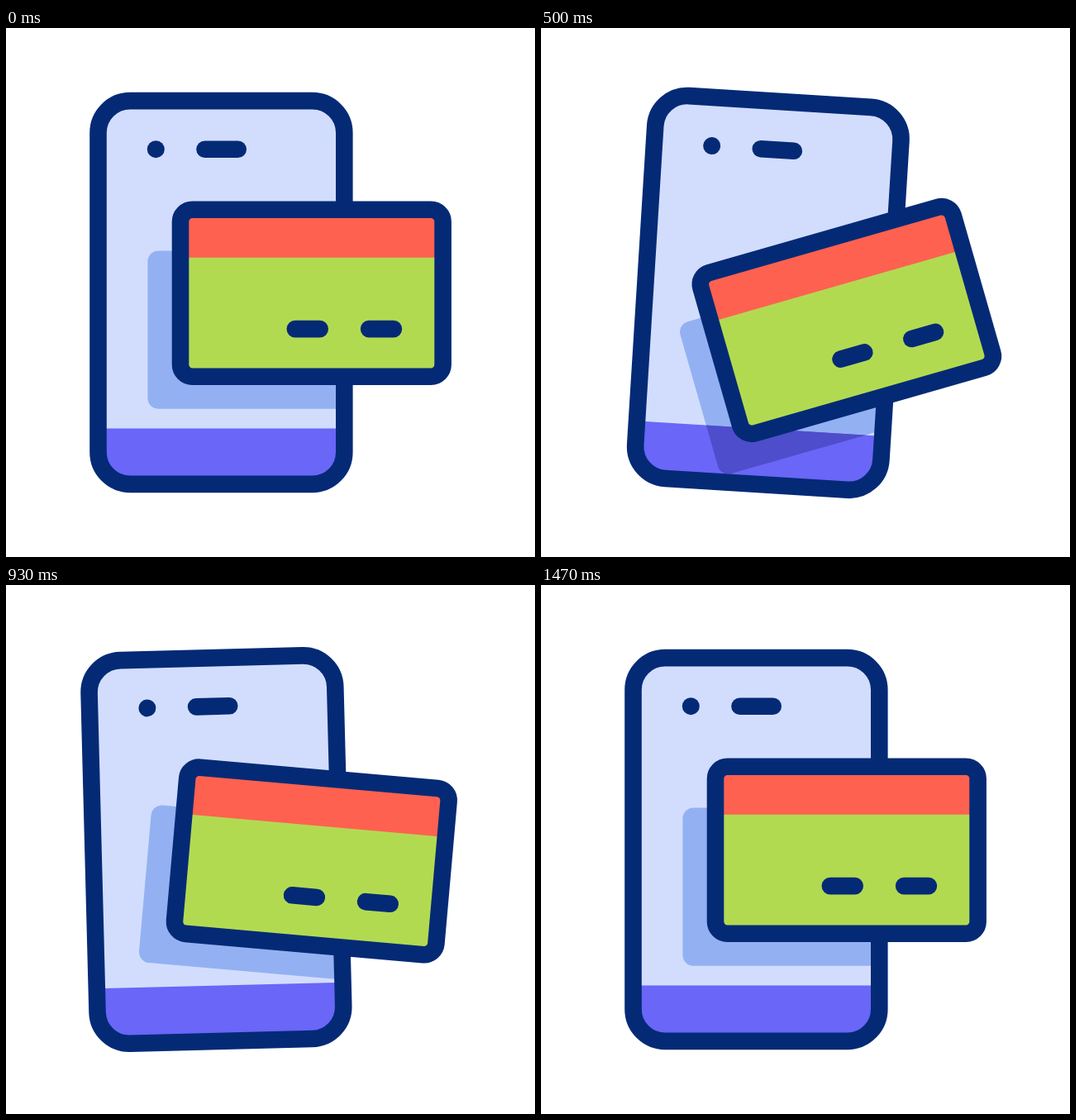
Animation, 640 px wide and 640 px high, one loop 2 s. Source, as an HTML page with a canvas:

```html
<!DOCTYPE html>
<html lang="en">
<head>
<meta charset="utf-8">
<title>Phone and card</title>
<style>
  html, body { margin: 0; width: 100%; height: 100%; overflow: hidden; background: #fff; }
  canvas { display: block; width: 100vmin; height: 100vmin; }
</style>
</head>
<body>
<canvas width="640" height="640"></canvas>
<script>
const ctx = document.querySelector('canvas').getContext('2d');

const LOOP = 2000;
const STEP = 100 / 3;
const NAVY = '#042a76';
const SCREEN = '#d2ddfd';
const SHADE = '#93b1f2';
const BAND = '#6966f8';
const BAND_SHADE = '#4e4dcb';
const RED = '#ff6150';
const GREEN = '#b2da51';
const LINE = 20.6;

// Keys are [step, value], joined by sine easing.
const phoneAngle = [[0, 0], [9.95, 9.7], [21.2, -4.9], [35, 2.1], [44, 0]];
const cardAngle = [[0, 0], [11.5, -22], [23.7, 9.7], [35, -5], [44, 0]];
const cardDrop = [[0, 0], [9.95, 55.2], [21.4, 0], [35, 27.6], [44, 0]];

function valueAt(keys, step) {
  for (let i = 1; i < keys.length; i++) {
    const [t0, v0] = keys[i - 1];
    const [t1, v1] = keys[i];
    if (step <= t1) {
      const u = (step - t0) / (t1 - t0);
      return v0 + (v1 - v0) * (1 - Math.cos(Math.PI * u)) / 2;
    }
  }
  return keys[keys.length - 1][1];
}

function box(x0, y0, x1, y1, radius = 0) {
  const path = new Path2D();
  path.roundRect(x0, y0, x1 - x0, y1 - y0, radius);
  return path;
}

const phone = box(111.5, 88.1, 409.3, 551.9, 38.7);
const band = box(100, 484.5, 420, 570);
const card = box(211, 219.8, 528.6, 421.8, 14.5);
const cardShade = box(171.4, 269.4, 509, 460.7, 13);

function fill(path, color) {
  ctx.fillStyle = color;
  ctx.fill(path);
}

function outline(path) {
  ctx.strokeStyle = NAVY;
  ctx.lineWidth = LINE;
  ctx.stroke(path);
}

function pill(x0, x1, y) {
  const r = LINE / 2;
  fill(box(x0, y - r, x1, y + r, r), NAVY);
}

function turned(x, y, degrees, drop, draw) {
  ctx.save();
  ctx.translate(x, y + drop);
  ctx.rotate(degrees * Math.PI / 180);
  ctx.translate(-x, -y);
  draw();
  ctx.restore();
}

function render(step) {
  const onPhone = draw => turned(260.4, 552, valueAt(phoneAngle, step), 0, draw);
  const onCard = draw => turned(369.9, 320.7, valueAt(cardAngle, step), valueAt(cardDrop, step), draw);

  ctx.fillStyle = '#fff';
  ctx.fillRect(0, 0, 640, 640);

  // The card's shadow stays inside the phone and darkens over the band.
  ctx.save();
  onPhone(() => fill(phone, SCREEN));
  clipToPhone(phone);
  onCard(() => fill(cardShade, SHADE));
  onPhone(() => fill(band, BAND));
  clipToPhone(band);
  onCard(() => fill(cardShade, BAND_SHADE));
  ctx.restore();

  onPhone(() => {
    outline(phone);
    ctx.beginPath();
    ctx.arc(181.3, 146.7, 10.5, 0, Math.PI * 2);
    ctx.fillStyle = NAVY;
    ctx.fill();
    pill(230.2, 291, 146.7);
  });

  onCard(() => {
    fill(card, GREEN);
    fill(box(211, 222, 528.6, 277.7), RED);
    outline(card);
    pill(339.5, 390, 364.1);
    pill(428.8, 479.2, 364.1);
  });

  function clipToPhone(path) {
    const placed = new Path2D();
    const turn = new DOMMatrix()
      .translate(260.4, 552)
      .rotate(valueAt(phoneAngle, step))
      .translate(-260.4, -552);
    placed.addPath(path, turn);
    ctx.clip(placed);
  }
}

function tick() {
  const time = performance.now() % LOOP;
  render(Math.floor((time + 3.4) / STEP) % 60);
  requestAnimationFrame(tick);
}
tick();
</script>
</body>
</html>
```
